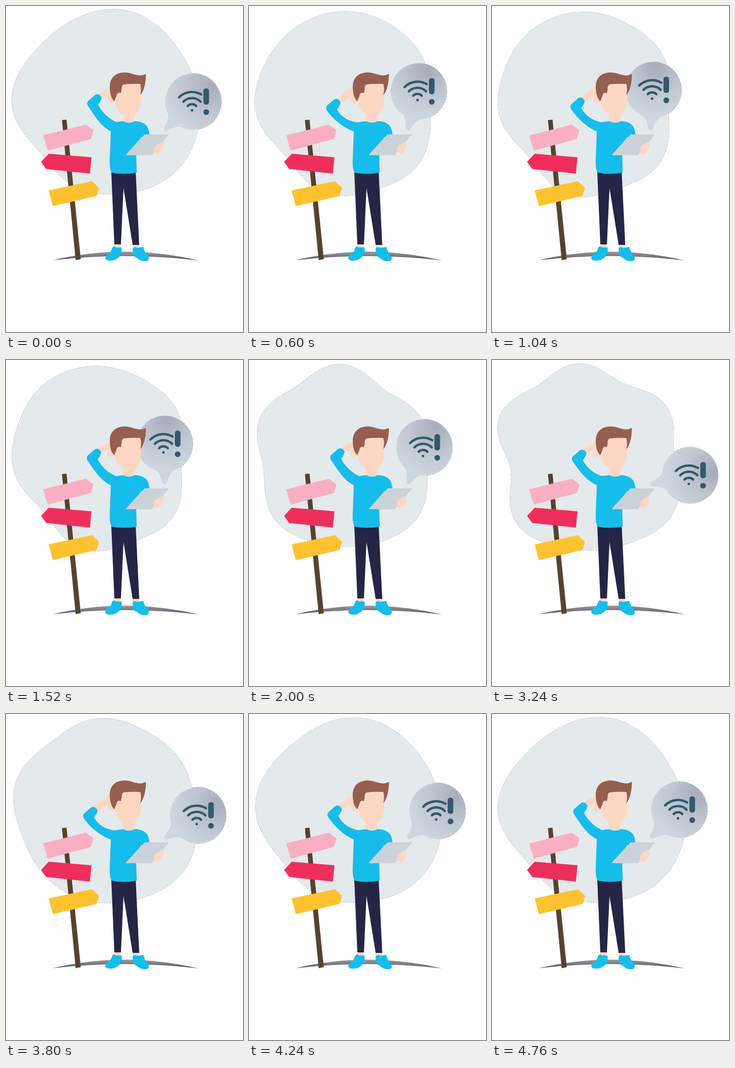
Animation of 466 by 640 pixels, one loop 4800 ms. Source, as an HTML page:

```html
<!DOCTYPE html>
<html lang="en">
<head>
<meta charset="utf-8">
<title>Which way</title>
<style>
  html, body { margin: 0; width: 100%; height: 100%; overflow: hidden; background: #fff; }
  svg { display: block; width: 466px; height: 640px; }
</style>
</head>
<body>
<svg viewBox="0 0 466 640">
  <defs>
    <radialGradient id="haze" gradientUnits="userSpaceOnUse" cx="4" cy="-126" r="98">
      <stop offset="0" stop-color="#a8abba"/>
      <stop offset=".5" stop-color="#bec5cf"/>
      <stop offset="1" stop-color="#cfd7de"/>
    </radialGradient>
    <linearGradient id="earth" x1="0" y1="0" x2="0" y2="1">
      <stop offset="0" stop-color="#989ba1"/>
      <stop offset="1" stop-color="#54575d"/>
    </linearGradient>
    <path id="blob"/>
    <g id="bubble">
      <circle cy="-79.5" r="55.2"/>
      <path d="M-25,-31C-10,-26 -8,-13 -4,-2Q0,2 4,-2C8,-13 10,-26 25,-31Z"/>
    </g>
  </defs>

  <g fill="none" stroke="#333" stroke-width="1" stroke-dasharray="3 2" opacity=".6">
    <use href="#blob"/>
    <use href="#bubble" class="swing"/>
  </g>
  <use href="#blob" fill="#e4e9ec"/>
  <path fill="url(#earth)" d="M92,499Q236,465.500 379,499.500Q236,483 92,499Z"/>

  <use href="#bubble" class="swing" fill="url(#haze)"/>
  <g id="icon" fill="#31596e">
    <path id="waves" fill="none" stroke="#31596e" stroke-width="4.600" stroke-linecap="round"/>
    <circle cx="-2.500" cy="17" r="2.500"/>
    <rect x="20" y="-26" width="11" height="32" rx="5"/>
    <circle cx="25.500" cy="20.500" r="5.600"/>
  </g>

  <path fill="#58422c" d="M110,224L119,223L147,497L137,499Z"/>
  <path fill="#f9afc1" d="M73,254L157,233L172,244L167,261L82,284Z"/>
  <path fill="#ef2f5b" d="M84,290L168,297L165,329L79,320L69,306Z"/>
  <path fill="#fec231" d="M84,362L169,344L183,357L178,373L92,393Z"/>

  <g fill="#fdd7c2">
    <path d="M213,465H225V480H213ZM249,466H261V480H249Z"/>
    <path id="wrist"/>
  </g>
  <path fill="#252545" d="M207,325H255L262,469H249L231,357L226,468H213Z"/>
  <g fill="#16bdea">
    <path d="M209,474Q213,470 216,474L227,474Q229,485 224,491Q213,503 198,499Q193,496 197,490Q207,484 209,474Z"/>
    <path d="M249,476Q253,471 257,475L270,473Q272,483 279,490Q284,498 276,501Q264,502 257,494Q249,493 249,476Z"/>
    <path id="sleeve"/>
    <path d="M231,226Q241,232 252,226C268,226 278,233 280,242Q283,250 282,262L256,292L257,327Q230,332 208,327Q203,322 204,300L206,248Q207,236 215,228Z"/>
  </g>

  <path fill="#fdd7c2" d="M214,187C206,194 199,190 200,181C201,174 206,173 212,176L216,150H264Q267,165 265,190Q263,206 252,214V227Q241,231 230,226V212Q216,205 214,187Z"/>
  <path fill="#965e50" d="M213,187C207,182 204,172 204,157C205,139 217,130 235,130.500C248,131 256,138 268,136C272,135 273,133 275,134C275,147 273,165 264,175Q267,163 264,153Q245,152 231,154Q227,156 227.500,163L226,171Q218,168 217,177Z"/>

  <path fill="#cad2da" stroke="#cad2da" stroke-width="2" stroke-linejoin="round" d="M273,253H318.500L286,292H237L265,261L266,258L267,260Z"/>
  <path fill="#fdd7c2" d="M291,284Q291,274 299,271Q305,266 309,268Q311,281 301,289Q294,292 291,287Z"/>
</svg>

<script>
const LOOP = 4800, SCRATCH = 400, TAU = 2 * Math.PI;
const $ = id => document.getElementById(id);
const mix = (a, b, k) => a + (b - a) * k;
const mixAll = (a, b, k) => a.map((v, i) => mix(v, b[i], k));

function bezier(x1, y1, x2, y2) {
  const at = (s, a, b) => 3 * (1 - s) * (1 - s) * s * a + 3 * (1 - s) * s * s * b + s * s * s;
  return x => {
    let lo = 0, hi = 1;
    for (let i = 0; i < 24; i++) {
      const m = (lo + hi) / 2;
      if (at(m, x1, x2) < x) lo = m; else hi = m;
    }
    return at(lo, y1, y2);
  };
}
const ease = bezier(.25, .1, .25, 1);
const slowStart = bezier(.13, 0, .45, 1);

// Blob shapes: mean radius, then cosine and sine weights of each harmonic.
const round = [179, 17.7, 0, 1.3, 4.6, -5.4, 1.3, 3, 2.6, -1.6, 0, .7, -.9];
const narrow = [174, 1.7, -.7, -6, 5.8, -3.5, -3.1, 0, 0, -4.9, 1.1, -1.5, -2.5];
const dented = [173, 0, 5.9, -3.6, 5.3, 1.8, 2.3, -2.3, .6, 0, -6.6, -4.4, .8];
const wavy = [179, 5.3, 7.6, -3.2, 6, 3.9, 0, -6, 2.8, -1.6, -6.8, -6.3, 3.5];
const wide = mixAll(dented, wavy, 1.12);

const phases = [
  { end: 1600, curve: ease, tilt: [45, 0], shapes: [[0, round], [1, narrow]] },
  { end: 1680, curve: ease, tilt: [0, 0], shapes: [[0, narrow], [1, narrow]] },
  { end: 3120, curve: slowStart, tilt: [0, 79], shapes: [[0, narrow], [.3, dented], [1, wide]] },
  { end: 4800, curve: ease, tilt: [79, 45], shapes: [[0, wide], [1, round]] }
];

function shapeAt(shapes, p) {
  const i = Math.max(1, shapes.findIndex(s => p <= s[0]));
  const [p0, a] = shapes[i - 1], [p1, b] = shapes[i];
  return mixAll(a, b, (p - p0) / (p1 - p0));
}

function outline([mean, ...weights]) {
  const pts = [];
  for (let a = 0; a < TAU; a += TAU / 120) {
    const r = weights.reduce((sum, w, i) => {
      const n = (i >> 1) + 1;
      return sum + w * (i % 2 ? Math.sin(n * a) : Math.cos(n * a));
    }, mean);
    pts.push([185 + r * Math.cos(a), 190 + r * Math.sin(a)].map(v => v.toFixed(2)));
  }
  return "M" + pts.join("L") + "Z";
}

// Concentric signal arcs; the outermost stops short of the exclamation mark.
function signal() {
  const polar = (r, deg) => {
    const a = deg * Math.PI / 180;
    return [-2.5 + r * Math.sin(a), 17 - r * Math.cos(a)];
  };
  return [12, 24, 36].map(r =>
    `M${polar(r, -45)}A${r},${r} 0 0 1 ${polar(r, r > 30 ? 30 : 45)}`).join("");
}

// The elbow and cuff move together; shoulder and fingers stay.
function drawArm(k) {
  const at = (x, y) => `${x - 8 * k},${y + 9 * k} `;
  $("sleeve").setAttribute("d",
    `M215,249C188,242 ${at(174, 214)}${at(161, 196)}Q${at(158, 190)}${at(162, 186)}` +
    `L${at(176, 174)}Q${at(183, 171)}${at(188, 180)}Q${at(188, 185)}${at(181, 194)}` +
    `Q${at(194, 218)}219,229Z`);
  $("wrist").setAttribute("d",
    `M${at(180, 175)}Q${at(190, 166)}205,${162 - 6 * k}L206,173L${at(187, 182)}Z`);
}

function draw(ms) {
  const t = ms % LOOP;
  const n = phases.findIndex(f => t < f.end);
  const { end, curve, tilt, shapes } = phases[n];
  const start = n ? phases[n - 1].end : 0;
  const p = curve((t - start) / (end - start));

  $("blob").setAttribute("d", outline(shapeAt(shapes, p)));

  const deg = mix(...tilt, p), a = deg * Math.PI / 180;
  for (const el of document.querySelectorAll(".swing"))
    el.setAttribute("transform", `translate(312 244) rotate(${deg})`);
  $("icon").setAttribute("transform",
    `translate(${312 + 79.5 * Math.sin(a)} ${244 - 79.5 * Math.cos(a)})`);

  const u = t % SCRATCH / SCRATCH * 2;
  drawArm(u < 1 ? ease(u) : 1 - ease(u - 1));
}

function frame() {
  draw(performance.now());
  requestAnimationFrame(frame);
}
$("waves").setAttribute("d", signal());
frame();
</script>
</body>
</html>
```
